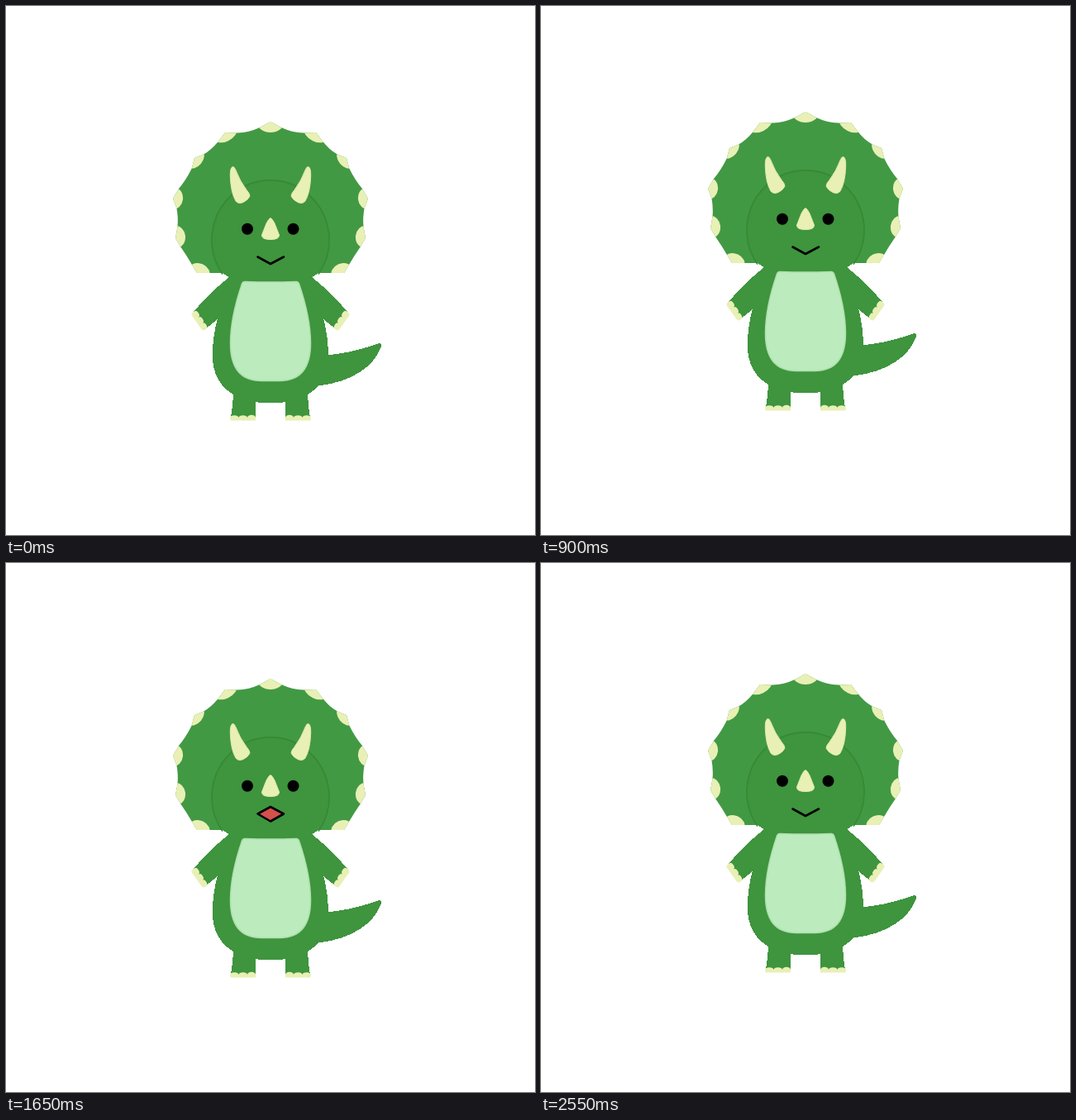
Recreate the animation shown at these times as an HTML page without scripts. Size 640 by 640 pixels, loop 2.7 s.

```html
<!DOCTYPE html>
<html lang="en">
<head>
<meta charset="utf-8">
<title>Hopping dinosaur</title>
<style>
  html, body { margin: 0; width: 100%; height: 100%; overflow: hidden; background: #fff; }
  svg { display: block; width: 100vw; height: 100vh; }
  .skin { fill: #3f943e; shape-rendering: crispEdges; }
  .frill { fill: #429943; }
  .cream { fill: #e8f0b5; }
  .horn { fill: #e8f0b5; stroke: #e0eaab; }
  .crease { fill: none; stroke: #368a35; stroke-width: 1.8; }
  .belly { fill: #bcebbd; stroke: #aee0ae; stroke-width: 1.5; }
  .ink { fill: none; stroke: #000; stroke-width: 2.6; stroke-linecap: round; stroke-linejoin: round; }
  .shut { stroke-width: 3; }
  .open { fill: #d5504a; }
</style>
</head>
<body>
<svg viewBox="0 0 640 640" xmlns="http://www.w3.org/2000/svg">
  <defs>
    <path id="halfFrill" shape-rendering="crispEdges" d="M321 140 L320 140 L307 147 Q294 153 280 153.500 L265 153 L257 163.500 Q249 174 239 179.500 L228 184 L224.500 197 Q217.500 211 209 221 L202 233 L206.500 245 Q208.500 256 207.500 267 L205 281 L211 291 Q218 301 225 313 L231 323 H321 Z"/>
    <clipPath id="frillEdge">
      <use href="#halfFrill"/>
      <use href="#halfFrill" transform="translate(640) scale(-1 1)"/>
    </clipPath>
    <g id="spots" class="cream">
      <ellipse rx="15" ry="9" transform="translate(265 155) rotate(-25)"/>
      <ellipse rx="13" ry="9" transform="translate(229 185) rotate(-50)"/>
      <ellipse rx="10" ry="13" transform="translate(204 233) rotate(8)"/>
      <ellipse rx="10" ry="13" transform="translate(207 279) rotate(-8)"/>
      <ellipse rx="13" ry="10" transform="translate(234 321.500) rotate(25)"/>
    </g>
    <path id="horn" class="horn" d="M274 194.500 Q271 196 271.300 206 Q272 226 278 236 Q281 240 287 237.500 Q293 234.500 295 230 Q295 227 291 222.500 Q283 212 277.500 197.500 Q276 194 274 194.500 Z"/>
    <g id="armDown">
      <path class="skin" d="M300 326 L270 328 Q245 348 227 370 L241 391 L256 379 L300 385 Z"/>
      <path class="cream" d="M228.500 369 Q224 371 224.500 374 L236.500 391 Q239 394 242.500 390.500 A4.200 2.800 57 0 0 238 383.500 A4.200 2.800 57 0 0 233 376.500 A4.400 2.800 57 0 0 228.500 369 Z"/>
    </g>
    <g id="armUp">
      <path class="skin" d="M300 326 L268 328 Q245 328.500 219 330.500 L219 358 L259 365 L300 370 Z"/>
      <path class="cream" d="M221.500 330 Q217 329.500 217 332 L215 355 Q214.500 358 220 358 A2.800 4.700 0 0 0 220.500 348.700 A2.800 4.700 0 0 0 221 339.400 A2.800 4.700 0 0 0 221.500 330 Z"/>
    </g>
    <g id="leg">
      <path class="skin" d="M275 477 Q292 470 302 485 V498 H272 Z"/>
      <path class="cream" d="M272 501.500 Q271 501 271 498 A5.300 3.300 0 0 1 281.500 498 A5.300 3.300 0 0 1 292 498 A5 3.300 0 0 1 302 498 V501.500 Z"/>
    </g>
    <path id="thigh" class="crease" d="M275 477 Q291 470 301.500 484"/>
  </defs>

  <rect width="640" height="640" fill="#fff"/>

  <g>
    <animateTransform attributeName="transform" type="translate" dur="2.7s" repeatCount="indefinite" calcMode="discrete"
      values="0 0;0 4;0 8;0 12;0 -4;0 -8;0 -12;0 6;0 -6;0 6;0 12;0 0;0 -6;0 -12;0 -18;0 -12;0 6;0 -6"/>

    <!-- head -->
    <g clip-path="url(#frillEdge)">
      <rect class="frill" x="200" y="138" width="240" height="190"/>
      <ellipse class="cream" cx="320" cy="143" rx="15" ry="10"/>
      <use href="#spots"/>
      <use href="#spots" transform="translate(640) scale(-1 1)"/>
    </g>
    <path class="skin" d="M262 323 A71 72 0 1 1 378 323 L370 328.500 H270 Z"/>
    <path class="crease" d="M262 324.500 A71 72 0 1 1 378 324.500"/>

    <!-- tail and trunk -->
    <path class="skin" d="M380 422.500 Q412 422 450 408.500 Q455 407.500 454 412 C445 437 417 455 378 459.500 L350 465 Z"/>
    <path class="skin" d="M270 328 H370 L376 350 C384 375 390 398 390 420 C391 443 382 460 365 470 Q346 480.500 320 480.500 Q294 480.500 275 470 C258 460 249 443 250 420 C250 398 256 375 264 350 Z"/>

    <g>
      <animate attributeName="visibility" dur="2.7s" repeatCount="indefinite" calcMode="discrete"
        values="visible;hidden;visible" keyTimes="0;.6666;.8888"/>
      <use href="#armDown"/>
      <use href="#armDown" transform="translate(640) scale(-1 1)"/>
    </g>
    <g visibility="hidden">
      <animate attributeName="visibility" dur="2.7s" repeatCount="indefinite" calcMode="discrete"
        values="hidden;visible;hidden" keyTimes="0;.6666;.8888"/>
      <use href="#armUp"/>
      <use href="#armUp" transform="translate(640) scale(-1 1)"/>
    </g>

    <path class="belly" d="M289 333.500 Q320 334.500 351 333.500 Q353.500 333.500 354.500 336 C362 358 368.500 384 368.500 408 C368.500 440 354 453.500 331 453.500 H309 C286 453.500 271.500 440 271.500 408 C271.500 384 278 358 285.500 336 Q286.500 333.500 289 333.500 Z"/>

    <!-- face -->
    <use href="#horn"/>
    <use href="#horn" transform="translate(640) scale(-1 1)"/>
    <path class="horn" d="M320 256.500 Q322 257 325 263 L330.500 277 Q331 282.500 320 282.500 Q309 282.500 309.500 277 L315 263 Q318 257 320 256.500 Z"/>
    <g>
      <animate attributeName="visibility" dur="2.7s" repeatCount="indefinite" calcMode="discrete"
        values="visible;hidden;visible" keyTimes="0;.5;.6111"/>
      <circle cx="292" cy="269.700" r="7"/>
      <circle cx="347.500" cy="269.700" r="7"/>
    </g>
    <path class="ink shut" visibility="hidden" d="M291 264.500 L298 270.500 L291 276 M349 264.500 L342 270.500 L349 276">
      <animate attributeName="visibility" dur="2.7s" repeatCount="indefinite" calcMode="discrete"
        values="hidden;visible;hidden" keyTimes="0;.5;.6111"/>
    </path>
    <path class="ink" d="M304.500 303.500 L320 312 L336 303.500">
      <animate attributeName="visibility" dur="2.7s" repeatCount="indefinite" calcMode="discrete"
        values="visible;hidden;visible" keyTimes="0;.6111;.8888"/>
    </path>
    <path class="ink open" visibility="hidden" d="M304.500 303.500 L320 295 L336 303.500 L320 312.500 Z">
      <animate attributeName="visibility" dur="2.7s" repeatCount="indefinite" calcMode="discrete"
        values="hidden;visible;hidden" keyTimes="0;.6111;.8888"/>
    </path>
  </g>

  <!-- legs stay planted while the body squats -->
  <g>
    <animateTransform attributeName="transform" type="translate" dur="2.7s" repeatCount="indefinite" calcMode="discrete"
      values="0 0;0 0;0 0;0 0;0 -4;0 -8;0 -12;0 0;0 -6;0 0;0 0;0 0;0 -6;0 -12;0 -18;0 -12;0 0;0 -6"/>
    <path class="skin" d="M275 468 H302 V486 H274 Z M338 468 H365 L366 486 H338 Z"/>
    <use href="#leg"/>
    <use href="#leg" transform="translate(640) scale(-1 1)"/>
    <g visibility="hidden">
      <animate attributeName="visibility" dur="2.7s" repeatCount="indefinite" calcMode="discrete"
        values="hidden;visible;visible;visible;hidden;hidden;hidden;visible;hidden;visible;visible;hidden;hidden;hidden;hidden;hidden;visible;hidden"/>
      <use href="#thigh"/>
      <use href="#thigh" transform="translate(640) scale(-1 1)"/>
    </g>
  </g>
</svg>
</body>
</html>
```
